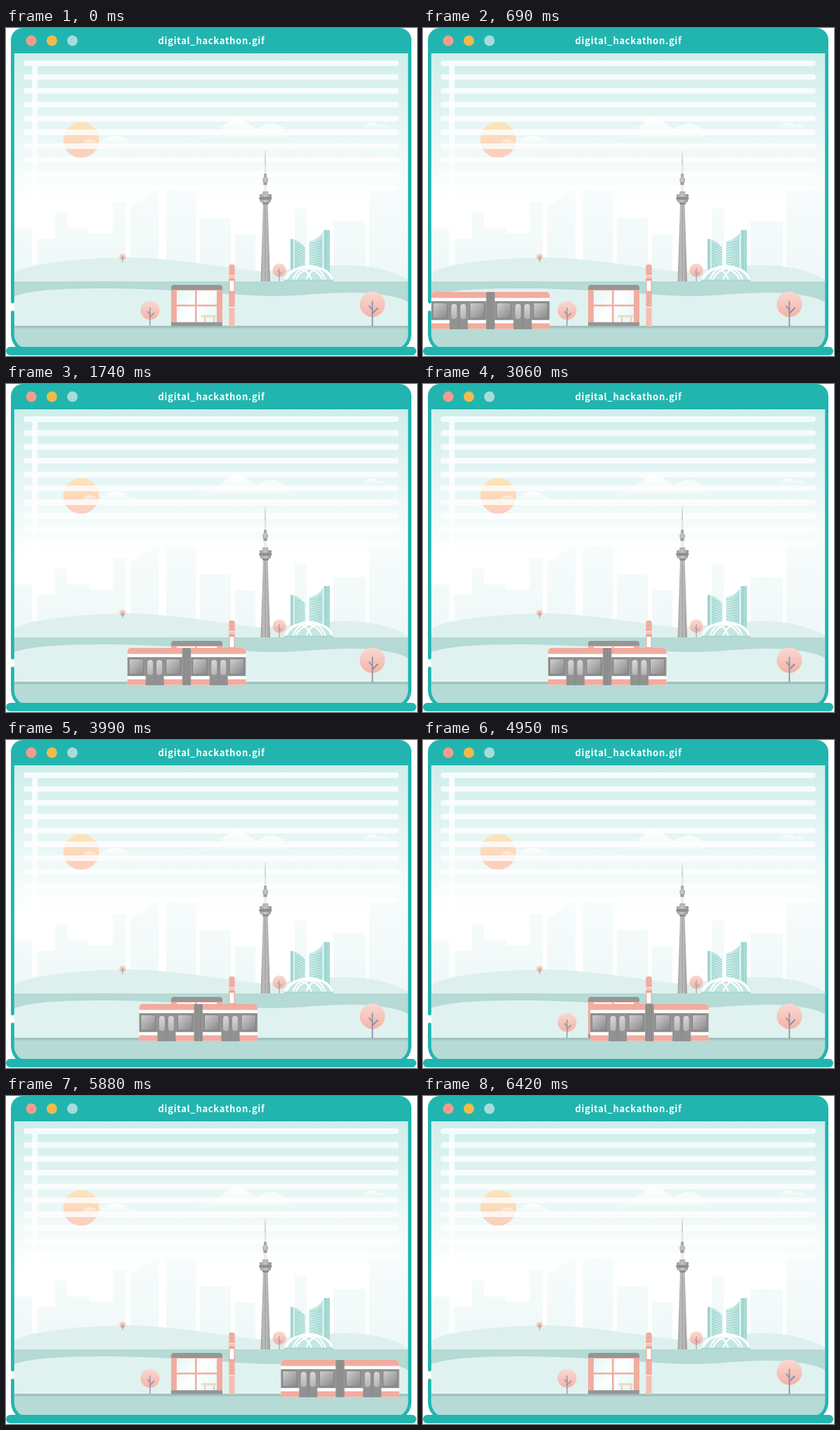
Recreate the animation shown at these times as an HTML page with a canvas. Size 585 px wide and 466 px high, loop 6870 ms.

```html
<!DOCTYPE html>
<html lang="en">
<head>
<meta charset="utf-8">
<title>digital_hackathon.gif</title>
<style>
html, body { margin: 0; width: 100%; height: 100%; overflow: hidden; background: #fff; }
canvas { position: absolute; left: 0; top: 0; width: 585px; height: 466px; }
h1 {
  position: absolute; left: 7px; top: 0; width: 571px; margin: 0;
  font: bold 13px/36px "Noto Sans CJK JP", "Noto Sans CJK SC", "Noto Sans", sans-serif;
  letter-spacing: 0.7px; text-align: center; color: #fff; white-space: nowrap;
}
</style>
</head>
<body>
<canvas id="stage" width="585" height="466"></canvas>
<h1>digital_hackathon.gif</h1>
<script>
const W = 585, H = 466, LOOP = 6870;
const TEAL = '#22b5b0', CORAL = '#f2ac9f', GREY = '#969696', BAND = '#b6dad5';
const view = document.getElementById('stage').getContext('2d');
let c = view;

// Left edge of the streetcar: [ms, px]
const track = [
  [0, -273], [240, -158], [900, 69.5], [1110, 114], [1590, 165], [2070, 178],
  [3060, 178], [3720, 183.8], [3990, 189.5], [4410, 204.2], [4950, 238],
  [5430, 293], [5790, 367], [6405, 573], [6870, 790]
];

function slope(i) {
  const p = track[i - 1], q = track[i], r = track[i + 1];
  if (!p) return (r[1] - q[1]) / (r[0] - q[0]);
  if (!r) return (q[1] - p[1]) / (q[0] - p[0]);
  const h = q[0] - p[0], k = r[0] - q[0];
  const a = (q[1] - p[1]) / h, b = (r[1] - q[1]) / k;
  return a === 0 || b === 0 ? 0 : (a * k + b * h) / (h + k);
}

function trainX(t) {
  let i = 0;
  while (i < track.length - 2 && t >= track[i + 1][0]) i++;
  const [t0, x0] = track[i], [t1, x1] = track[i + 1];
  const d = t1 - t0, u = (t - t0) / d, v = 1 - u;
  return x0 * (1 + 2 * u) * v * v + x1 * u * u * (3 - 2 * u)
    + d * slope(i) * u * v * v - d * slope(i + 1) * u * u * v;
}

function rect(x, y, w, h, fill, r = 0) {
  c.fillStyle = fill;
  c.beginPath();
  c.roundRect(x, y, w, h, r);
  c.fill();
}

function disc(x, y, r, fill) {
  c.fillStyle = fill;
  c.beginPath();
  c.arc(x, y, r, 0, 7);
  c.fill();
}

function shape(d, fill) {
  c.fillStyle = fill;
  c.fill(new Path2D(d));
}

function line(d, color, width) {
  c.strokeStyle = color;
  c.lineWidth = width;
  c.stroke(new Path2D(d));
}

function grad(x0, y0, x1, y1, ...colors) {
  const g = c.createLinearGradient(x0, y0, x1, y1);
  colors.forEach((s, i) => g.addColorStop(i / (colors.length - 1), s));
  return g;
}

const fade = (y0, y1) => grad(0, y0, 0, y1, '#fff', 'rgba(255,255,255,0)');

function sky() {
  rect(7, 30, 570, 430, grad(0, 36, 0, 245, '#ceeeeb', '#fff'));
  disc(107, 159, 25.5, grad(0, 133, 0, 185, '#fde5b9', '#fbcdbf'));
  shape('M107 166Q113 158 120 158Q126 158 131 164Q145 153 156 153Q168 153 184 166Z', fade(153, 167));
  shape('M270 160Q292 147 306 143Q318 129 328 129Q340 130 357 144Q368 136 379 136Q391 136 400 148L410 160Z', fade(130, 160));
  shape('M508 142Q514 134 521 134Q527 134 531 139Q536 135 539 138Q543 138 545 142Z', fade(133, 143));

  const blocks = [
    [12, 26, 285], [38, 32, 300], [70, 17, 262], [87, 31, 285], [118, 34, 292], [152, 18, 247],
    [228, 42, 230], [276, 44, 270], [326, 29, 293], [411, 17, 255], [466, 46, 274], [517, 56, 222]
  ];
  const haze = grad(0, 220, 0, 350, '#f8fcfc', '#eff8f8');
  for (const [x, w, y] of blocks) rect(x, y, w, 360 - y, haze);
  shape('M177 360V253L217 230V360Z', haze);
}

function blinds() {
  const slat = 'rgba(255,255,255,.78)';
  rect(37, 54, 8, 282, slat);
  for (let i = 0; i < 10; i++) rect(25, 46 + i * 19.67, 534, 8, slat, 4);
}

function tree(x, y, r, foot) {
  disc(x, y, r, grad(0, y - r, 0, y + r, '#f9d9d2', '#f4b3a7'));
  const k = r / 18;
  line(`M${x} ${y - 5 * k}V${foot}M${x} ${y + 13 * k}L${x + 8 * k} ${y + 5 * k}M${x} ${y + 8 * k}L${x - 5 * k} ${y + 2 * k}`,
    '#8b8fa9', Math.max(0.8, 1.8 * k));
}

function tower() {
  const steel = grad(362, 0, 376, 0, '#a2a2a2', '#c6c6c6', '#9a9a9a');
  shape('M368.8 174H369.2L370 207H368Z', '#b5b5b5');
  rect(367.8, 193, 2.6, 14, '#e4e4e4');
  rect(367, 207, 4, 5, '#a9a9a9');
  rect(365.3, 212, 7.6, 8, steel, 3);
  shape('M366 219H372L371 225H367Z', '#a0a0a0');
  rect(367, 223, 4.2, 10, '#ededed');
  shape('M366 250H372.5L376 360H362.5Z', steel);
  rect(365, 232, 8.5, 4, '#b7b7b7', 1);
  rect(361, 236, 17, 4, steel, 1);
  rect(360, 240, 18.5, 4, '#8f8f8f', 2);
  rect(361.5, 244, 15.5, 3.5, steel, 1);
  shape('M364 247.5H375L373 251H366Z', '#8d8d8d');
  line('M369 252V360', 'rgba(120,120,120,.35)', 2);
}

function cityHall() {
  const glass = grad(405, 0, 461, 0, '#b4e0db', '#d3efeb', '#a5d9d3');
  shape('M405 299Q419 302 426 312V358H405Z', glass);
  shape('M431 303Q447 300 453 287H461V358H431Z', glass);
  for (let y = 306; y < 346; y += 3.5) {
    line(`M411 ${y}Q420 ${y + 2} 425 ${y + 6}M432 ${y}Q442 ${y} 450 ${y - 5}`, '#8ecdc7', 0.9);
  }
  rect(405, 300, 3.5, 58, '#a0d3ce');
  rect(409, 301, 1.5, 57, '#e6f6f4');
  rect(450.5, 290, 2, 68, '#e6f6f4');
  rect(453, 287, 4, 71, '#9fd6d0');

  const arch = (x, w, top) => `M${x} 359C${x + w * 0.16} ${top} ${x + w * 0.84} ${top} ${x + w} 359`;
  shape(arch(398, 67, 331), '#c3e7e3');
  [[398, 67, 331], [397, 38, 336], [427, 38, 336], [408, 47, 333], [398, 53, 335], [412, 53, 335]]
    .forEach(a => line(arch(...a), '#fff', 2.2));
  rect(396, 357.5, 70, 2.5, '#a9d9d4');
}

function shelter() {
  rect(235, 368, 73, 52, CORAL);
  rect(235, 365, 73, 7, GREY, [4, 4, 0, 0]);
  rect(243, 373, 57, 45, grad(243, 373, 300, 418, '#e2f8f6', '#fff', '#e0f7f5'));
  rect(269, 373, 2.6, 45, CORAL);
  rect(243, 393, 57, 2.6, CORAL);
  rect(278, 408, 21, 3, '#efd9c0');
  rect(282, 411, 2, 7, '#efcbb5');
  rect(295, 411, 2, 7, '#efcbb5');
  rect(235, 418, 73, 5.5, GREY);
}

function pole() {
  rect(317.5, 336, 8, 88, '#f5bdb2', [3, 3, 0, 0]);
  rect(317.5, 336, 8, 15, CORAL, [3, 3, 0, 0]);
  rect(317.5, 351, 8, 1.5, '#fbe4df');
  rect(317.5, 356, 8, 20, '#e9a294');
  rect(318.5, 359, 6, 15, '#fff', 1);
  rect(317.5, 376, 8, 20, CORAL);
  rect(317.5, 396, 8, 1.5, '#fbe4df');
}

function land() {
  shape('M11 348C30 336 90 327 175 326C250 327 320 343 365 346C410 343 440 337 485 337C530 337 565 351 573 359V362H11Z', '#def0ed');
  tree(166, 325, 4.5, 333);
  tower();
  cityHall();
  tree(389, 344, 9.5, 360);
  rect(7, 360, 570, 70, BAND);
  shape('M11 381C40 371 90 370 150 370C240 371 300 378 375 381C420 381 450 376 490 376C530 376 562 382 573 390V425H11Z', '#e0f2f0');
  rect(7, 426, 570, 34, BAND);
  rect(7, 423, 570, 3.5, '#a2c3be');
  tree(205, 401, 13.5, 423);
  tree(521.5, 392.5, 18, 424);
  shelter();
  pole();
}

const WELL = 'M12 30H572V436Q572 448 562 456H22Q12 448 12 436Z';

function scene() {
  rect(0, 0, W, H, '#fff');
  c.save();
  c.clip(new Path2D(WELL));
  sky();
  blinds();
  land();
  c.restore();
}

function frame() {
  c.lineCap = 'round';
  line('M9.4 30V389M9.4 404V436Q10 448 20 455M574.6 30V436Q574 448 564 455', TEAL, 4.8);
  c.lineCap = 'butt';
  rect(7, 0, 570, 36, TEAL, [17, 17, 0, 0]);
  rect(0, 453, 584, 12, TEAL, 6);
  disc(36, 18, 7.5, '#f49d8d');
  disc(65.3, 18, 7.5, '#eebc4d');
  disc(94.5, 18, 7.5, '#a5dcd9');
}

function pane(x) {
  rect(x, 390, 21.5, 23, '#7f7f7f');
  rect(x + 1, 391, 19.5, 21, grad(x, 391, x + 20, 412, '#cfcfcf', '#8a8a8a'), 1);
}

function door(x) {
  rect(x, 388, 26, 40, '#929292');
  for (const dx of [2.5, 15.5]) {
    rect(x + dx, 392, 8, 21.5, grad(x + dx, 392, x + dx + 8, 413, '#dadada', '#b3b3b3'), 4);
  }
  line(`M${x + 13} 389V428`, '#858585', 0.8);
}

function car(x, w, corners) {
  rect(x, 375, w, 52.5, '#fff', corners);
  rect(x, 375, w, 8.5, CORAL, corners);
  rect(x, 388, w, 27, GREY);
  rect(x, 419.5, w, 8, CORAL);
}

function train(x) {
  car(x, 79, [5, 0, 0, 0]);
  car(x + 89.5, 79, [0, 5, 0, 0]);
  for (const dx of [2, 54.5, 92.5, 145]) pane(x + dx);
  door(x + 26);
  door(x + 117);
  rect(x + 78, 375, 12.5, 53, '#949494', 1.5);
  for (const dx of [81, 84.2, 87.4]) line(`M${x + dx} 376V427`, '#838383', 0.9);
}

function layer(paint) {
  const cv = document.createElement('canvas');
  cv.width = W;
  cv.height = H;
  c = cv.getContext('2d');
  paint();
  c = view;
  return cv;
}

const back = layer(scene), front = layer(frame);
const start = performance.now();

function draw(now) {
  const t = Math.max(0, now - start) % LOOP;
  c.drawImage(back, 0, 0);
  if (t >= 240 && t < 6420) {
    c.save();
    c.beginPath();
    c.rect(7, 370, 566, 60);
    c.clip();
    train(trainX(t));
    c.restore();
  }
  c.drawImage(front, 0, 0);
  requestAnimationFrame(draw);
}
draw(start);
</script>
</body>
</html>
```
